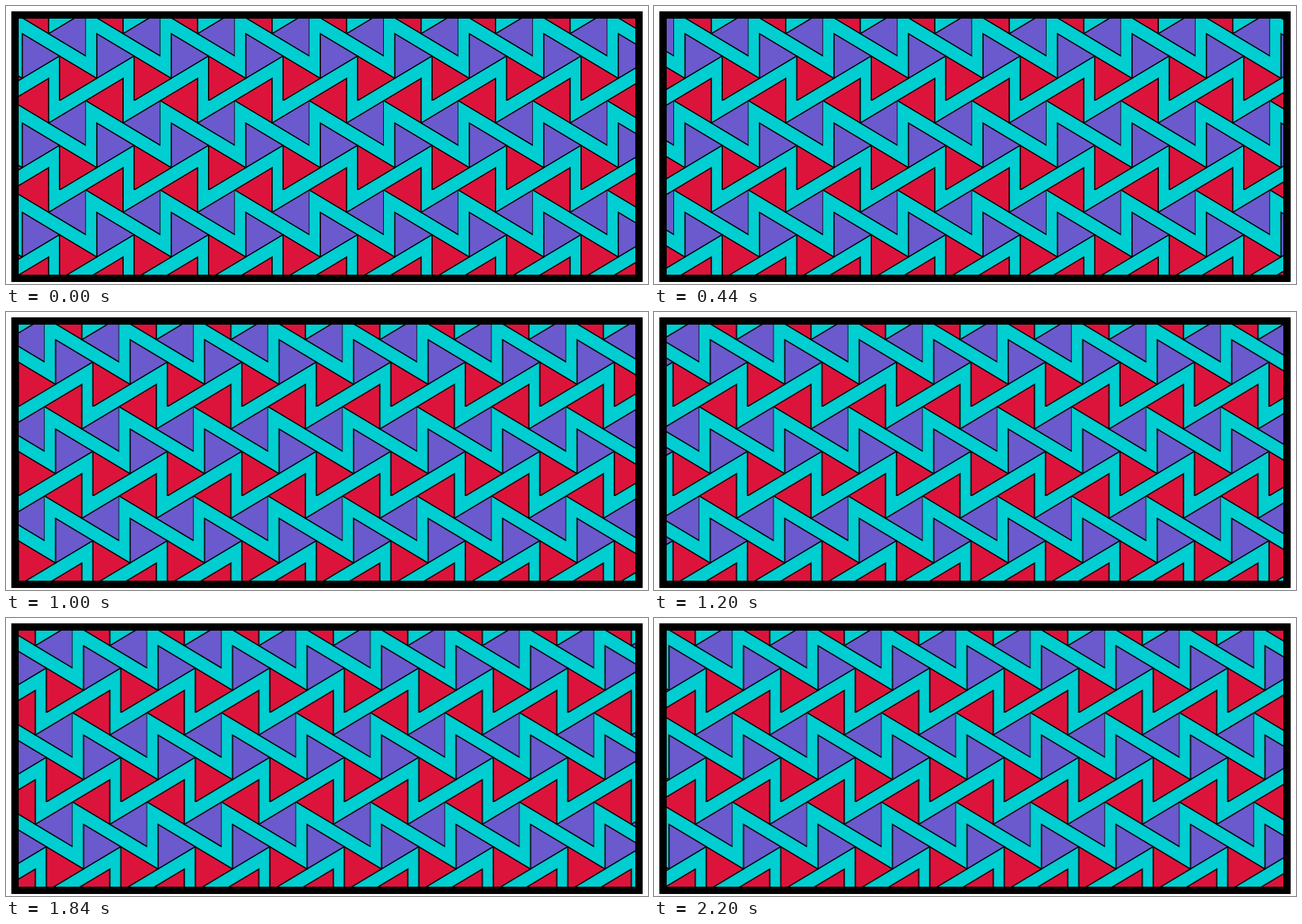
Animation of 960x417 px, one loop 2.24 s. Source, as an HTML page:

```html
<!DOCTYPE html>
<html lang="en">
<head>
<meta charset="utf-8">
<title>Sliding triangle tiling</title>
<style>
  html, body { margin: 0; width: 100%; height: 100%; overflow: hidden; background: #fff; }
  svg { display: block; width: 960px; height: 417px; }
  path { stroke: #000; stroke-width: 1.8; }
  .red { fill: #dc143c; }
  .blue { fill: #6a5acd; }
  #tiles { animation: slide 2240ms steps(56, end) infinite; }
  @keyframes slide {
    from { transform: translate(0, 0); }
    to { transform: translate(111.4px, 0); }
  }
</style>
</head>
<body>
<svg viewBox="0 0 960 417">
  <defs>
    <clipPath id="tileBox"><rect width="111.4" height="134"/></clipPath>
    <clipPath id="tileFloor"><rect width="140" height="134"/></clipPath>
    <g id="tile">
      <path class="blue" clip-path="url(#tileBox)" d="M111.4 0V67L55.7 33.5Z"/>
      <path class="blue" d="M16.4 33.5V100.5L72.1 67Z"/>
      <path class="red" clip-path="url(#tileFloor)" d="M72.1 67V134L127.8 100.5Z"/>
      <path class="red" d="M55.7 100.5V167.5L0 134Z"/>
    </g>
    <clipPath id="window"><rect x="19" y="19" width="922" height="384"/></clipPath>
  </defs>
  <rect x="8" y="8" width="944" height="406" fill="#00ced1"/>
  <g clip-path="url(#window)"><g id="tiles"></g></g>
  <rect x="13.5" y="13.5" width="933" height="395" fill="none" stroke="#000" stroke-width="11"/>
</svg>
<script>
  const tiles = document.getElementById('tiles');
  for (let row = -1; row < 3; row++) {
    for (let col = -2; col < 9; col++) {
      const use = document.createElementNS('http://www.w3.org/2000/svg', 'use');
      use.setAttribute('href', '#tile');
      use.setAttribute('x', 8 + col * 111.4);
      use.setAttribute('y', 8 + row * 134);
      tiles.append(use);
    }
  }
</script>
</body>
</html>
```
